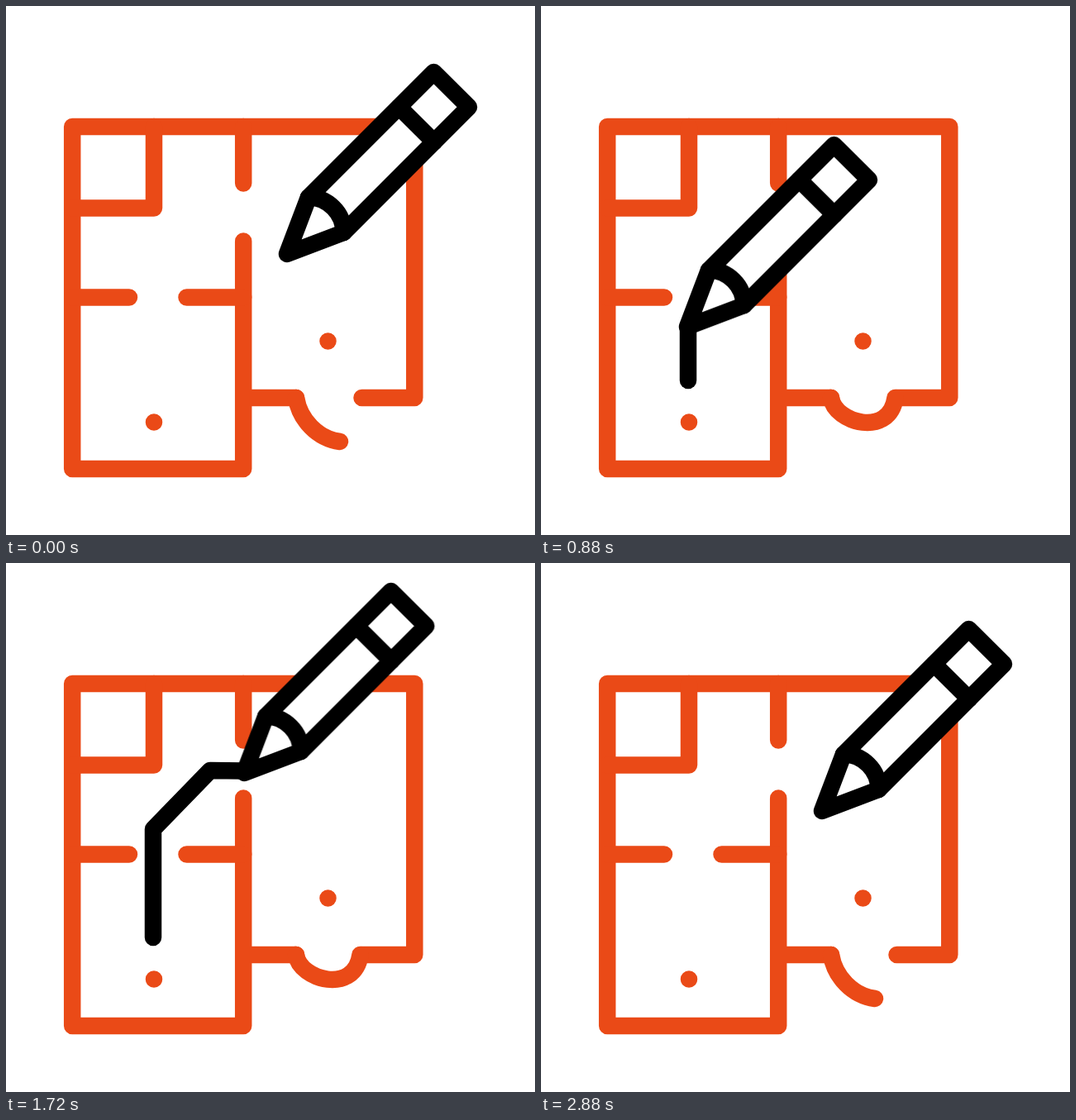
Recreate the animation shown at these times as an HTML page. Size 640 px wide and 640 px high, loop 3 s.

```html
<!DOCTYPE html>
<html lang="en">
<head>
<meta charset="utf-8">
<title>Floor plan</title>
<style>
  html, body { margin: 0; width: 100%; height: 100%; overflow: hidden; background: #fff; }
  svg {
    display: block; width: 100%; height: 100%;
    fill: none; stroke-width: 20.5; stroke-linecap: round; stroke-linejoin: round;
    --ease: cubic-bezier(.37, 0, .63, 1);
  }
  .plan { stroke: #ea4a17; }
  .ink { stroke: #000; }
  .door, .route, .pencil { animation: 3s var(--ease) infinite; }
  .door { animation-name: door; }
  .route { animation-name: draw, show; }
  .pencil { animation-name: move; fill: #fff; }

  @keyframes door {
    0%, 3.3%, 83.3%, 100% { d: path("M351 474C355.5 501 377 523.5 404 527"); }
    13.3%, 73.3% { d: path("M351 474C355.5 505 422 522 428.5 474"); }
  }

  @keyframes move {
    0%, 9% { transform: translate(0, 0); }
    19.1%, 23.3% { transform: translate(-165px, 154px); }
    35.5% { transform: translate(-161px, 21px); }
    48%, 48.5% { transform: translate(-93px, -46px); }
    67.2% { transform: translate(-3px, -46px); }
    79%, 100% { transform: translate(0, 0); }
  }

  /* The route follows the pencil tip, then winds back to its start. */
  @keyframes draw {
    0%, 23.3% { stroke-dasharray: 0 500; }
    35.5% { stroke-dasharray: 131 500; }
    48%, 48.5% { stroke-dasharray: 230 500; }
    67.2% { stroke-dasharray: 319.5 500; animation-timing-function: cubic-bezier(.5, 0, .9, .8); }
    74.3% { stroke-dasharray: 350 500; animation-timing-function: linear; }
    96%, 100% { stroke-dasharray: 0 500; }
  }

  @keyframes show {
    0%, 100% { opacity: 0; animation-timing-function: step-end; }
    23.4% { opacity: 1; animation-timing-function: step-end; }
    95.9% { opacity: 0; animation-timing-function: step-end; }
  }
</style>
</head>
<body>
<svg viewBox="0 0 640 640">
  <g class="plan">
    <path d="M430.500 474H494.300V146H80.200V560H287.200V284.500M287.200 474H351"/>
    <path d="M287.200 146V214.500M80.200 244.500H179V146M80.200 352.500H149M287.200 352.500H218.500"/>
    <path d="M179 503.500h.01M389.500 405.500h.01"/>
    <path class="door" d="M351 474C355.500 501 377 523.500 404 527"/>
  </g>
  <g class="ink">
    <path class="route" d="M178 453V322L247 251L336.500 252L340 300"/>
    <g class="pencil">
      <path d="M340 300L366 231.500L517.500 80L560 122.300L408.500 274Z"/>
      <path d="M475.500 122.300L518 164.500M366 231.500A42.500 42.500 0 0 1 408.500 274" fill="none"/>
    </g>
  </g>
</svg>
</body>
</html>
```
